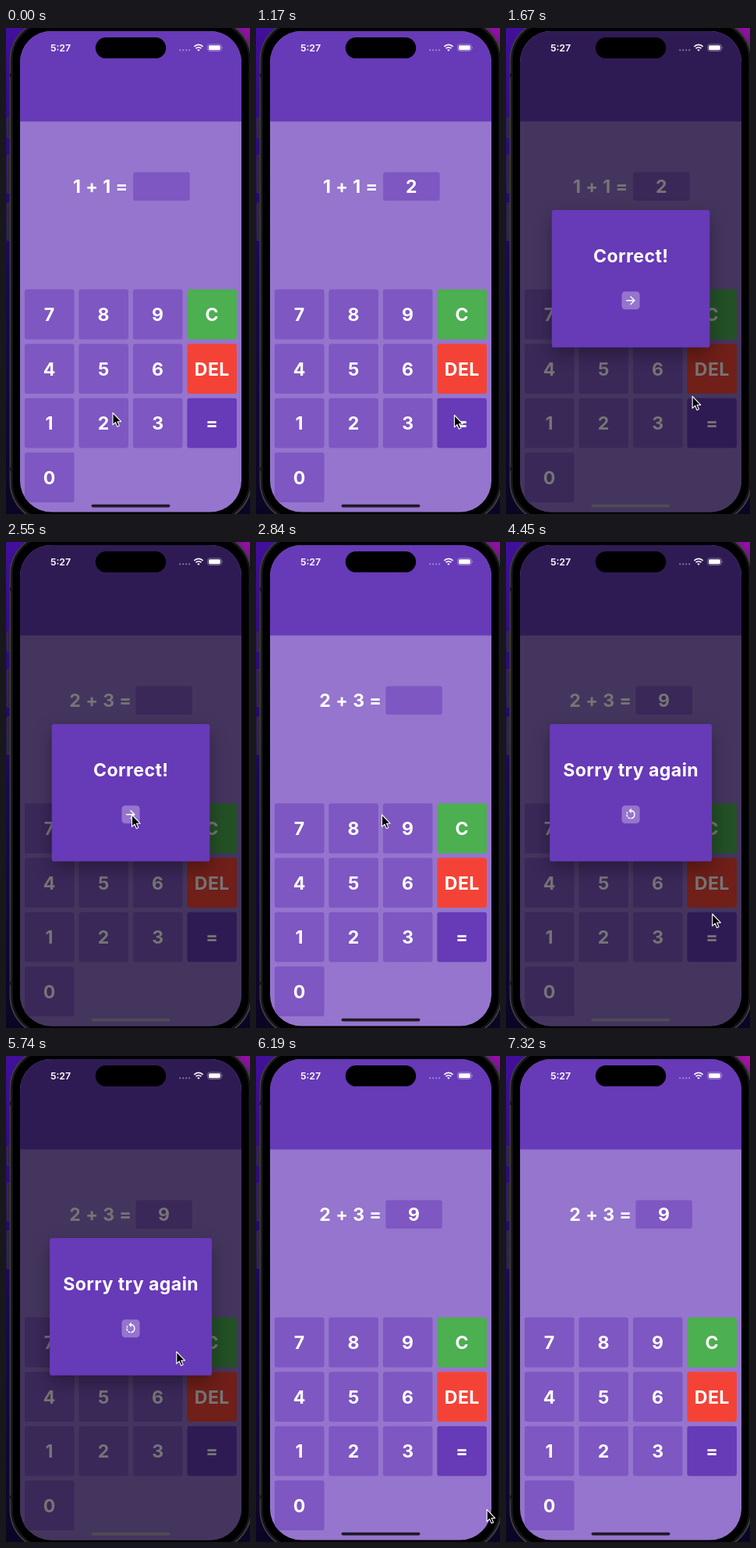
Animation, 313 px wide and 622 px high, one loop 7.42 s. Source, as an HTML page:

```html
<!DOCTYPE html>
<html lang="en">
<head>
<meta charset="utf-8">
<title>Math quiz</title>
<style>
  html, body { margin: 0; width: 100%; height: 100%; overflow: hidden; background: #0b0524; }
  svg { display: block; }
  text { font: 700 23.1px Inter, "Noto Sans", sans-serif; letter-spacing: .42px; fill: #fff; text-anchor: middle; }
  #clock { font-size: 12.3px; font-weight: 600; letter-spacing: 0; }
  #card { filter: drop-shadow(0 9px 11px rgba(0,0,0,.32)); }
</style>
</head>
<body>
<svg width="313" height="622" viewBox="0 0 313 622">
  <defs>
    <linearGradient id="night" x2="0" y2="1">
      <stop offset="0" stop-color="#420f9c"/>
      <stop offset=".2" stop-color="#310c7c"/>
      <stop offset=".5" stop-color="#190950"/>
      <stop offset="1" stop-color="#0b0524"/>
    </linearGradient>
    <radialGradient id="pink" gradientUnits="userSpaceOnUse" cx="313" cy="0" r="60">
      <stop offset="0" stop-color="#b312a0"/>
      <stop offset="1" stop-color="#b312a0" stop-opacity="0"/>
    </radialGradient>
    <clipPath id="screen"><rect x="18" y="4" width="284" height="615.5" rx="40"/></clipPath>
  </defs>

  <rect width="313" height="622" fill="url(#night)"/>
  <rect id="glow" width="313" height="622" fill="url(#pink)"/>

  <g fill="#2b2930" stroke="#45424a" stroke-width=".6">
    <rect x="1.3" y="115" width="5" height="25" rx="1"/>
    <rect x="1.3" y="163" width="5" height="48" rx="1"/>
    <rect x="1.3" y="224" width="5" height="48" rx="1"/>
  </g>
  <rect x="5.5" y="-10" width="309" height="642" rx="51" stroke="#3d3b40" stroke-width="2"/>
  <rect x="7.8" y="-7.5" width="304.4" height="637" rx="48.5" fill="none" stroke="#1b1a1d" stroke-width="1.5"/>
  <path d="M5 60.5h4M5 564.5h4M311 60.5h4M311 564.5h4" stroke="#151417" stroke-width="4"/>

  <g clip-path="url(#screen)">
    <rect x="18" y="4" width="284" height="616" fill="#9575cd"/>
    <rect x="18" y="4" width="284" height="115.6" fill="#673ab7"/>
    <text id="sum" x="121.4" y="211"></text>
    <rect id="box" y="184.6" width="72.5" height="36.4" rx="2.9" fill="#7e57c2"/>
    <text id="answer" y="211"></text>
    <g id="keys"></g>
    <g id="dialog">
      <rect x="18" y="4" width="284" height="616" fill="#000" fill-opacity=".54"/>
      <rect id="card" y="233" height="175.8" rx="2.9" fill="#673ab7"/>
      <text id="message" x="160.2" y="300.4"></text>
      <rect x="148.5" y="337.2" width="23.1" height="23.1" rx="4.5" fill="#9575cd"/>
      <g transform="translate(151.35 340.05) scale(.7226)">
        <path id="next" fill="#fff" d="M12 4l-1.4 1.4 5.6 5.6H4v2h12.2l-5.6 5.6L12 20l8-8z"/>
        <g id="retry" fill="none" stroke="#fff" stroke-width="2">
          <path d="M12.5 5.1a7 7 0 0 1 0 13.9"/>
          <path d="M11 18.9A7 7 0 0 1 6.4 7.8" stroke-dasharray="4.1 1.6"/>
          <path d="M13 1v9L8.4 5.5z" fill="#fff" stroke="none"/>
        </g>
      </g>
    </g>
    <rect id="home" x="109.5" y="609.8" width="101" height="3.6" rx="1.8"/>
  </g>

  <text id="clock" x="70" y="29.8">5:27</text>
  <rect x="114.8" y="12" width="90.4" height="26.8" rx="13.4"/>
  <path d="M223.2 28.3h13" stroke="#fff" stroke-opacity=".42" stroke-width="2.2" stroke-linecap="round" stroke-dasharray="0 4"/>
  <g fill="none" stroke="#fff" stroke-width="1.7">
    <path d="M241.4 23.8a7.9 7.9 0 0 1 11.2 0M243.5 26.2a5 5 0 0 1 7 0"/>
    <path d="M245.2 28a2.6 2.6 0 0 1 3.6 0L247 29.8z" fill="#fff" stroke="none"/>
  </g>
  <rect x="258.6" y="20.9" width="17.8" height="8.6" rx="2.8" fill="none" stroke="#fff" stroke-opacity=".45" stroke-width=".8"/>
  <rect x="260" y="22.2" width="15" height="6" rx="1.6" fill="#fff"/>
  <path d="M277.4 23.8q1.6 1.4 0 2.8z" fill="#fff" fill-opacity=".5"/>

  <path id="cursor" d="M0 0v15.4l3.5-3.2 2.4 5.5 2.5-1.1-2.4-5.4h4.6z" stroke="#fff" stroke-width="1.1" stroke-linejoin="round"/>
</svg>
<script>
const LOOP = 7420;
const $ = id => document.getElementById(id);
const set = (id, attrs) => {
  for (const name in attrs) $(id).setAttribute(name, attrs[name]);
};

const colours = { C: '#4caf50', DEL: '#f44336', '=': '#673ab7' };
$('keys').innerHTML = '7 8 9 C 4 5 6 DEL 1 2 3 = 0'.split(' ').map((label, i) => {
  const x = 23.9 + i % 4 * 69.5, y = 334.6 + Math.floor(i / 4) * 69.55;
  return `<rect x="${x}" y="${y}" width="63.6" height="63.8" rx="2.9" fill="${colours[label] || '#7e57c2'}"/>
    <text x="${x + 31.9}" y="${y + 40.4}">${label}</text>`;
}).join('');

// Pointer stops: time, x, y
const stops = [
  [0, 137, 492.5], [60, 137, 492.5], [200, 135, 495], [780, 253.5, 499.5],
  [1140, 253.5, 499.5], [1170, 254.5, 495.5], [1480, 254.5, 495.5],
  [2220, 161.5, 349], [3290, 161.5, 349], [3380, 188.5, 360.5], [3540, 188.5, 360.5],
  [3940, 264.7, 476], [4550, 264.7, 476], [5170, 161, 363], [5310, 161.2, 354],
  [5470, 161.2, 354], [5580, 216, 374.5], [5710, 216, 374.5], [5740, 218.8, 378.5],
  [5900, 218.8, 378.5], [6310, 316, 632], [6660, 318, 616], [6770, 221, 610],
  [6890, 240, 632], [LOOP, 240, 632]
];

function pointer(t) {
  const i = stops.findIndex(s => s[0] > t);
  const [t0, x0, y0] = stops[i - 1], [t1, x1, y1] = stops[i];
  const p = (t - t0) / (t1 - t0), e = p * p * (3 - 2 * p);
  return [x0 + (x1 - x0) * e, y0 + (y1 - y0) * e];
}

function dialogOpacity(t) {
  if (t >= 1500 && t < 2840) return t < 2700 ? 1 : .5;
  if (t >= 4450) return Math.max(0, Math.min(1, (5990 - t) / 60));
  return 0;
}

function draw(t) {
  const first = t < 2550, correct = t < 3000;
  const shown = dialogOpacity(t);

  $('sum').textContent = first ? '1 + 1 =' : '2 + 3 =';
  set('box', { x: first ? 163.2 : 166.4 });
  $('answer').textContent = first ? (t < 60 ? '' : '2') : (t < 3560 ? '' : '9');
  set('answer', { x: first ? 199.4 : 202.8 });

  $('message').textContent = correct ? 'Correct!' : 'Sorry try again';
  set('card', correct ? { x: 58.8, width: 202.6 } : { x: 56.1, width: 208 });
  set('next', { opacity: +correct });
  set('retry', { opacity: +!correct });
  set('dialog', { opacity: shown });
  set('home', { fill: shown > .5 ? '#504b52' : '#1f1a24' });

  set('glow', { opacity: t < 7320 ? .75 : 1 });
  set('cursor', { transform: `translate(${pointer(t)})` });
}

const start = performance.now();
function tick() {
  draw((performance.now() - start) % LOOP);
  requestAnimationFrame(tick);
}
tick();
</script>
</body>
</html>
```
